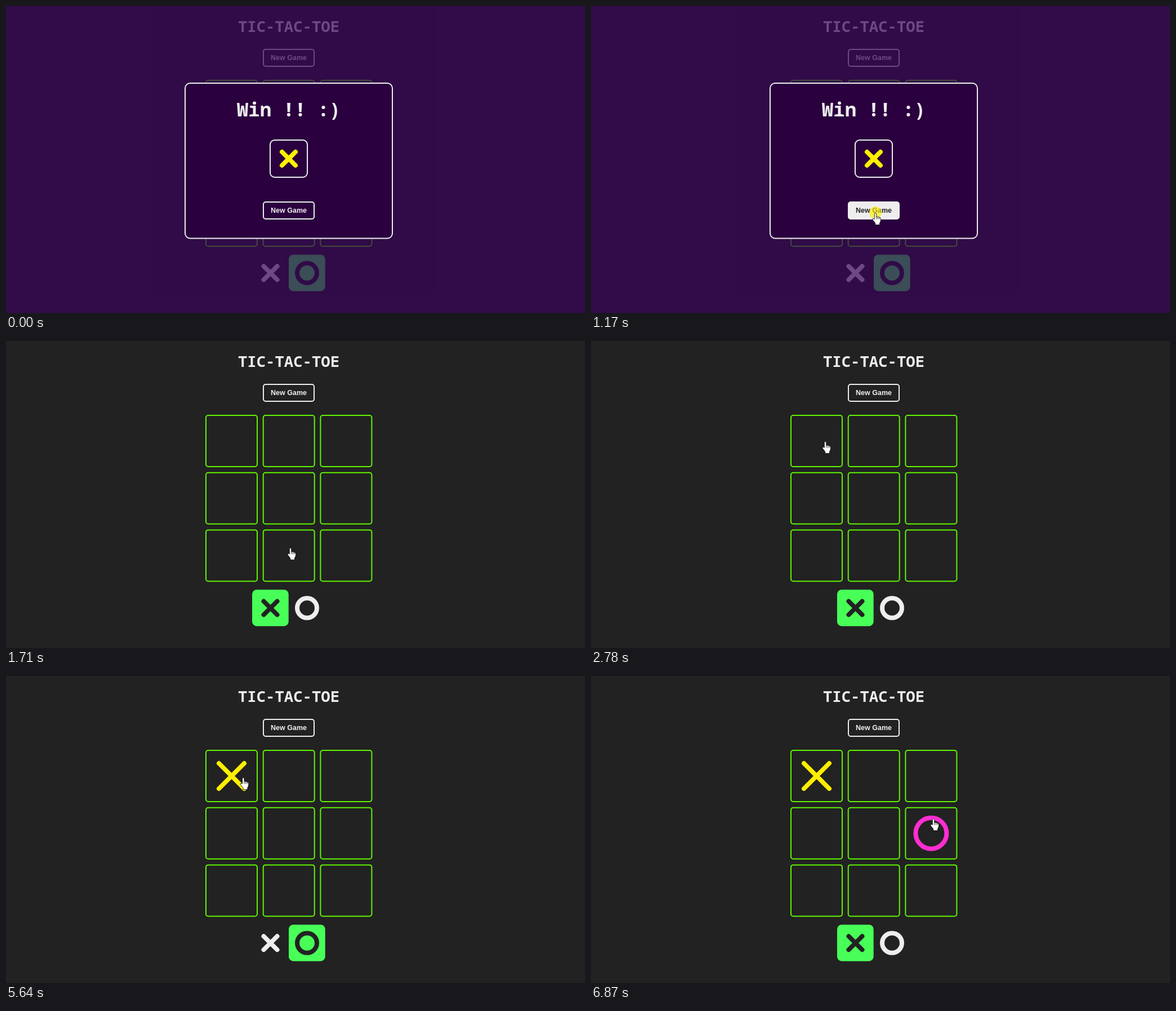
Recreate the animation shown at these times as an HTML page. Size 1028 px wide and 545 px high, loop 8000 ms.

```html
<!DOCTYPE html>
<html lang="en">
<head>
<meta charset="utf-8">
<title>Tic-Tac-Toe</title>
<style>
  html, body { margin: 0; width: 100%; height: 100%; overflow: hidden; background: #222; }
  svg { display: block; width: 100%; height: 100%; }
  text { text-anchor: middle; fill: #eee; font-weight: bold; }
  .mono { font-family: "Noto Sans Mono", "Liberation Mono", monospace; }
  .label { font: bold 12.5px "Liberation Sans", Arial, sans-serif; }
  .box { fill: none; stroke: #eee; stroke-width: 2; }
  .cell { fill: none; stroke: #5ff500; stroke-width: 2; }
  .mark { fill: none; stroke-width: 8; stroke-linecap: round; }
</style>
</head>
<body>
<svg viewBox="0 0 1028 545" xmlns="http://www.w3.org/2000/svg">
  <rect width="1028" height="545" fill="#222"/>
  <text class="mono" x="502" y="46" font-size="27.3">TIC-TAC-TOE</text>
  <rect class="box" x="457" y="77" width="90" height="30" rx="4"/>
  <text class="label" x="502" y="96.3">New Game</text>

  <g id="cells"></g>
  <path id="bigX" class="mark" stroke="#ffee00" d="M-22.5-22.5L22.5 22.5M22.5-22.5L-22.5 22.5"/>
  <circle id="bigO" class="mark" stroke="#ff2dd0" r="27.5"/>

  <rect id="turn" y="441.5" width="64.7" height="64.7" rx="8" fill="#48ff58"/>
  <path id="turnX" class="mark" transform="translate(469.5 474)" d="M-12-12L12 12M12-12L-12 12"/>
  <circle id="turnO" class="mark" cx="534.5" cy="474" r="17.5"/>

  <g id="overlay">
    <rect width="1028" height="545" fill="#370258" fill-opacity=".7"/>
    <g id="modal">
      <rect class="box" x="318" y="137" width="368" height="275.5" rx="9" style="fill:#2a003e"/>
      <text class="mono" x="502" y="196" font-size="34.2">Win !! :)</text>
      <rect class="box" x="469" y="238" width="66" height="66" rx="8"/>
      <path class="mark" stroke="#fff000" transform="translate(502 271)" d="M-12-12L12 12M12-12L-12 12"/>
      <rect id="btnFill" x="457" y="348" width="90" height="30" rx="4" fill="#eee"/>
      <rect class="box" x="457" y="348" width="90" height="30" rx="4"/>
      <text id="btnText" class="label" x="502" y="367.3">New Game</text>
    </g>
  </g>

  <g id="pointer">
    <circle id="press" r="11" fill="#ffee00" fill-opacity=".65"/>
    <circle id="blob" cx="15" cy="15" r="15" fill="#35b5e5"/>
    <g id="hand" stroke="#000" stroke-width=".8" stroke-linejoin="round">
      <path fill="#fff" d="M-1.7 1.6Q0-.8 1.7 1.6V7.2Q3.2 6.2 4.4 7.6Q6 6.8 7 8.3Q9.3 8 9.4 10.4V14.5L7.5 18.5V21.5H-.3V18.5L-4.9 12.6Q-5.3 9.6-3 10.2L-1.7 11.6Z"/>
      <path fill="none" d="M1.7 7V11.5M4.4 7.6V11.5M7 8.3V11.5"/>
    </g>
  </g>
</svg>
<script>
const LOOP = 8000;
const CLOSE = 1330, PLACE_X = 3310, PLACE_O = 6590;
const PRESSES = [[1170, 1370], [3110, 3310], [6520, 6590]];
// Pointer legs: start, end, from, to
const LEGS = [
  [190, 900, [877, 506], [505, 367]],
  [2390, 2780, [505, 367], [416, 178]],
  [5585, 6060, [416, 178], [608, 253]]
];
const STEP = 101.7, CELL_X = 355, CELL_Y = 132, CELL = 91;

const $ = id => document.getElementById(id);
const clamp = v => Math.min(1, Math.max(0, v));
const mix = (a, b, k) => a + (b - a) * k;
const ease = u => u < .5 ? 2 * u * u : 1 - 2 * (1 - u) * (1 - u);
const tween = (t, start, length) => ease(clamp((t - start) / length));
const show = (id, on) => $(id).setAttribute("visibility", on ? "visible" : "hidden");
const set = (id, name, value) => $(id).setAttribute(name, value);
const gray = k => {
  const v = Math.round(mix(238, 34, k));
  return `rgb(${v},${v},${v})`;
};

const cells = Array.from({ length: 9 }, (_, i) => [
  CELL_X + (i % 3) * STEP,
  CELL_Y + Math.floor(i / 3) * STEP
]);
$("cells").innerHTML = cells.map(([x, y]) =>
  `<rect class="cell" x="${x.toFixed(1)}" y="${y.toFixed(1)}" width="${CELL}" height="${CELL}" rx="4"/>`
).join("");

const inside = (p, x, y, w, h) => p[0] >= x && p[0] <= x + w && p[1] >= y && p[1] <= y + h;

function pointerAt(t) {
  const leg = LEGS.filter(l => t >= l[0]).pop() || LEGS[0];
  const [start, end, from, to] = leg;
  const k = tween(t, start, end - start);
  return from.map((v, i) => mix(v, to[i], k));
}

function drawMark(id, cell, k) {
  const [x, y] = cells[cell].map(v => v + CELL / 2);
  set(id, "transform", `translate(${x} ${y}) scale(${k})`);
  show(id, k > 0);
}

function drawTurn(t) {
  // 0: X to move, 1: O to move
  const k = 1 - tween(t, CLOSE, 180) + tween(t, PLACE_X, 240) - tween(t, PLACE_O, 240);
  set("turn", "x", mix(437, 502, k));
  set("turnX", "stroke", gray(1 - k));
  set("turnO", "stroke", gray(k));
}

function drawModal(t) {
  const k = 1 - tween(t, CLOSE, 214);
  const hover = tween(t, 760, 250);
  set("overlay", "opacity", k);
  set("modal", "opacity", k);
  set("modal", "transform", `translate(502 274.7) scale(${k}) translate(-502 -274.7)`);
  show("overlay", k > 0);
  set("btnFill", "opacity", hover);
  $("btnText").style.fill = gray(hover);
  return k > 0;
}

function drawPointer(t, modalOpen) {
  const p = pointerAt(t);
  const visible = t >= 190;
  const active = modalOpen
    ? t < CLOSE + 40 && inside(p, 456, 347, 92, 32)
    : cells.some(([x, y]) => inside(p, x - 1, y - 1, CELL + 2, CELL + 2));
  set("pointer", "transform", `translate(${p[0].toFixed(1)} ${p[1].toFixed(1)})`);
  show("hand", visible && active);
  show("blob", visible && !active);
  show("press", PRESSES.some(([a, b]) => t >= a && t < b));
}

function draw(t) {
  drawMark("bigX", 0, tween(t, PLACE_X, 270));
  drawMark("bigO", 5, tween(t, PLACE_O, 270));
  drawTurn(t);
  drawPointer(t, drawModal(t));
}

const begin = performance.now();
function frame() {
  draw((performance.now() - begin) % LOOP);
  requestAnimationFrame(frame);
}
frame();
</script>
</body>
</html>
```
